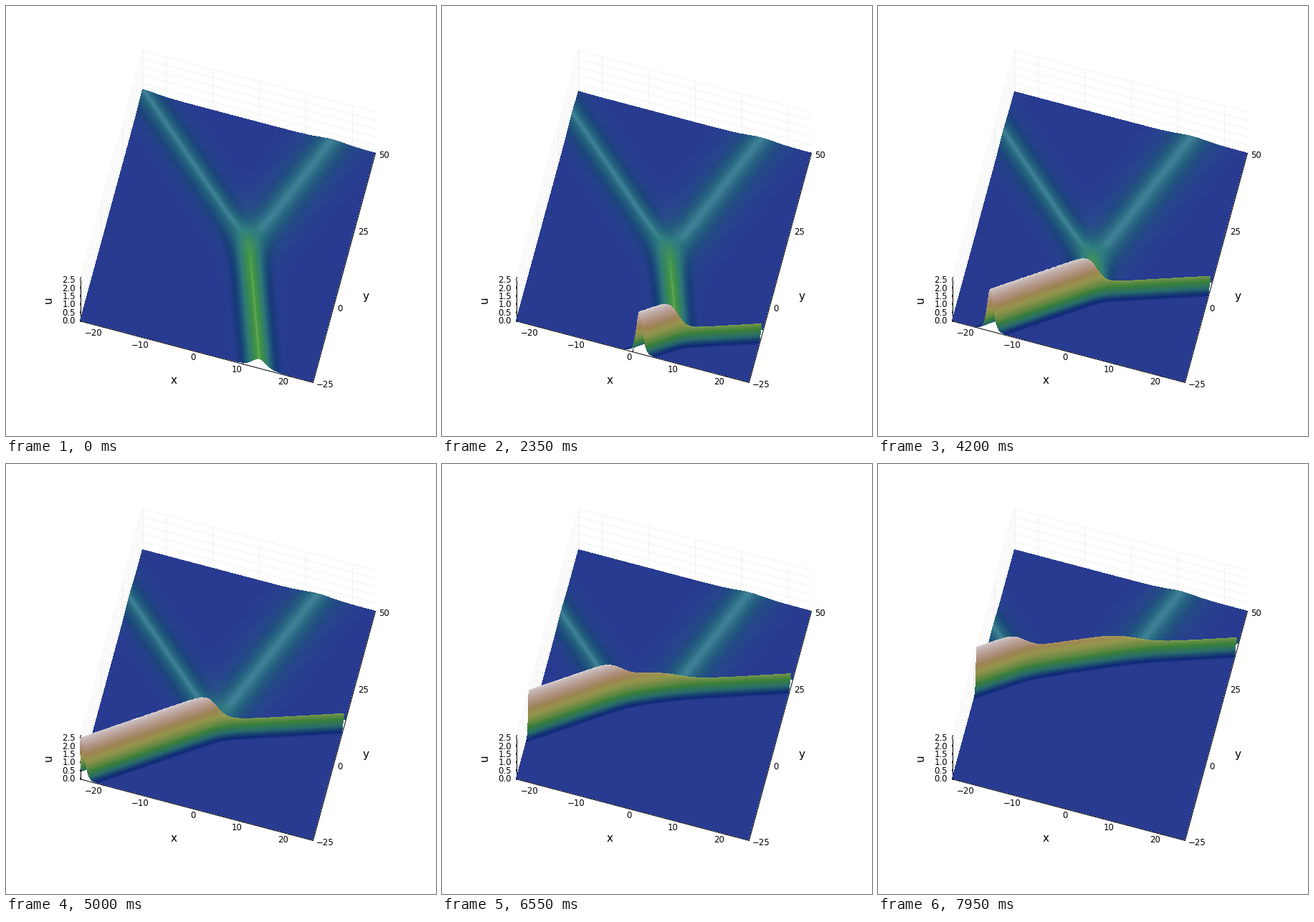
A matplotlib script for the animation above (8000 ms loop, 600 by 600 pixels).

```python
import numpy as np
import matplotlib.pyplot as plt
from matplotlib.animation import FuncAnimation

SIZE, DPI = 600, 100
FRAMES, INTERVAL = 160, 50
PX = 72 / DPI

# Orthographic camera: azimuth 15, elevation 80 degrees
ORIGIN = np.array([103.0, 439.0])
AZ, EL = np.radians(15), np.radians(80)
SIDE = 325 / np.cos(AZ)
EX = SIDE / 50 * np.array([np.cos(AZ), np.sin(AZ) * np.sin(EL)])
EY = SIDE / 75 * np.array([np.sin(AZ), -np.cos(AZ) * np.sin(EL)])
EZ = 57.2 / 2.5

# Four-exponential line-soliton solution of the KP-II equation
K = np.array([-0.64, -0.12, 0.40, 1.62])
SHIFT = np.array([0.0, -6.86, -7.82, -111.28])
SPEED = 4.95
POWERS = K[None, :] ** np.arange(5)[:, None]

# Light from straight above
AMBIENT, DIFFUSE, SPECULAR, SHINE = 0.8, 0.2, 0.1, 128
SLOPE_X, SLOPE_Y = 5.0, 7.5


def project(x, y, z=0.0):
    p = ORIGIN + (x + 25) * EX + (y + 25) * EY
    return p[0], p[1] - z * EZ


# Sample the ground plane along every pixel column, from back to front
LEFT, RIGHT, TOP, BOTTOM = 103, 515, 100, 530
SAMPLES = 500
cols = np.arange(LEFT, RIGHT) + 0.5
rows = np.arange(TOP, BOTTOM) + 0.5
back_x, back_y = project(-25, 50)
front_x, front_y = project(25, -25)
slope_x, slope_y = EX[1] / EX[0], EY[1] / EY[0]
back = np.where(cols < back_x, ORIGIN[1] + (cols - LEFT) * slope_y,
                back_y + (cols - back_x) * slope_x)
front = np.where(cols < front_x, ORIGIN[1] + (cols - LEFT) * slope_x,
                 front_y + (cols - front_x) * slope_y)
base = back[:, None] + (front - back)[:, None] * np.linspace(0, 1, SAMPLES)
inverse = np.linalg.inv(np.column_stack([EX, EY]))
dx, dy = cols[:, None] - ORIGIN[0], base - ORIGIN[1]
gx = inverse[0, 0] * dx + inverse[0, 1] * dy - 25
gy = inverse[1, 0] * dx + inverse[1, 1] * dy - 25
WAVES = np.exp(K[:, None] * gx.ravel() - K[:, None] ** 2 * gy.ravel())

steps = np.arange(SAMPLES, dtype=float)
levels = np.linspace(0, 3, 3001)
index = np.log10(1 + 9 * np.clip(0.0246 + levels / 2.7, 0, 1))
PALETTE = plt.get_cmap("gist_earth", 256)(
    (index * 255).astype(int))[:, :3].astype(np.float32)


def field(t):
    """Height and the upward part of the normal, on the sample grid."""
    weights = np.exp(K ** 3 * SPEED * t + SHIFT)
    m = (POWERS * weights) @ WAVES
    m1, m2, m3, m4 = m[1:] / m[0]
    var = m2 - m1 * m1
    skew = m3 - m1 * m2
    ux = 2 * SLOPE_X * (skew - 2 * m1 * var)
    uy = 2 * SLOPE_Y * (2 * m1 * skew - m4 + m2 * m2)
    up = 1 / np.sqrt(1 + ux * ux + uy * uy)
    return (2 * var).reshape(base.shape), up.reshape(base.shape)


def visible(screen):
    """Fractional sample index seen at each pixel, nan where nothing is."""
    flipped = screen[:, ::-1]
    low = np.minimum.accumulate(flipped, axis=1)[:, ::-1]
    high = np.maximum.accumulate(flipped, axis=1)
    hit = np.empty((len(cols), len(rows)))
    for i in range(len(cols)):
        hit[i] = np.interp(rows, low[i], steps, left=np.nan, right=np.nan)
        end = screen[i, -1]
        if high[i, -1] > end + 0.5:
            # the underside shows through the open edge
            below = rows > end
            hit[i, below] = np.interp(rows[below], high[i], steps[::-1],
                                      left=np.nan, right=np.nan)
    return hit


def render(t):
    u, up = field(t)
    hit = visible(base - EZ * u)
    seen = ~np.isnan(hit)
    col = np.nonzero(seen)[0]
    pos = hit[seen]
    i = np.minimum(pos.astype(int), SAMPLES - 2)
    f = pos - i
    flat = col * SAMPLES + i

    def sample(a):
        a = a.ravel()
        lo = a[flat]
        return lo + (a[flat + 1] - lo) * f

    height = np.clip(sample(u), 0, 3)
    cos = sample(up).astype(np.float32)
    shine = SPECULAR * cos ** SHINE
    rgb = PALETTE[(height * 1000).astype(int)]
    rgb = rgb * (AMBIENT + DIFFUSE * cos)[:, None] + shine[:, None]
    image = np.zeros(hit.shape + (4,), np.uint8)
    image[seen, :3] = np.clip(rgb, 0, 1) * 255
    image[seen, 3] = 255
    return image.transpose(1, 0, 2)


fig = plt.figure(figsize=(SIZE / DPI, SIZE / DPI), dpi=DPI, facecolor="white")
plt.rcParams["font.family"] = "DejaVu Sans"
ax = fig.add_axes([0, 0, 1, 1])


def line(a, b, **style):
    # half a pixel off, so strokes sit on pixel centres
    ax.plot([a[0] + 0.5, b[0] + 0.5], [a[1] + 0.7, b[1] + 0.7], **style)


def label(x, y, text, size=8.5, **style):
    ax.text(x, y, text, fontsize=size, color="black", **style)


X_TICKS = (-20, -10, 0, 10, 20)
Y_TICKS = (-25, 0, 25, 50)
Z_TICKS = (0, 0.5, 1, 1.5, 2, 2.5)
grid = dict(color=(0, 0, 0, 0.1), lw=0.5 * PX, zorder=1)
axis = dict(color="black", lw=1.0 * PX, zorder=2)
tick = EY / np.hypot(*EY) * 4


def add_axes_lines():
    for x in X_TICKS:
        line(project(x, 50), project(x, 50, 2.5), **grid)
    for y in Y_TICKS:
        line(project(-25, y), project(-25, y, 2.5), **grid)
    for z in Z_TICKS:
        line(project(-25, 50, z), project(25, 50, z), **grid)
        line(project(-25, -25, z), project(-25, 50, z), **grid)
    corner = project(-25, -25)
    line(corner, project(25, -25), **axis)
    line(project(25, -25), project(25, 50), **axis)
    line(corner, project(-25, -25, 2.5), **axis)
    starts = [project(x, -25) for x in X_TICKS]
    starts += [project(-25, -25, z) for z in Z_TICKS]
    for p in starts:
        line(p, (p[0] + tick[0], p[1] + tick[1]), **axis)


def add_labels():
    for x in X_TICKS:
        p = project(x, -25)
        label(p[0] - 1.3, p[1] + 12.3, str(x).replace("-", "\u2212"),
              ha="right")
    for y in Y_TICKS:
        p = project(25, y)
        label(p[0] + 5, p[1] + 7.7, str(y).replace("-", "\u2212"), ha="left")
    for z in Z_TICKS:
        p = project(-25, -25, z)
        label(p[0] - 6, p[1] + 4.3, f"{z:.1f}", ha="right")
    label(234.5, 527, "x", 11, ha="center")
    label(502, 410, "y", 11, ha="center")
    label(59, 410.5, "u", 11, ha="center", va="center", rotation=90)


add_axes_lines()
add_labels()
surface = ax.imshow(render(0), extent=(LEFT, RIGHT, BOTTOM, TOP),
                    aspect="auto", interpolation="nearest", zorder=3)
ax.set_xlim(0, SIZE)
ax.set_ylim(SIZE, 0)
ax.axis("off")


def update(n):
    surface.set_data(render(n * INTERVAL / 1000))
    return [surface]


anim = FuncAnimation(fig, update, frames=FRAMES, interval=INTERVAL,
                     repeat=True, cache_frame_data=False)
plt.show()
```
